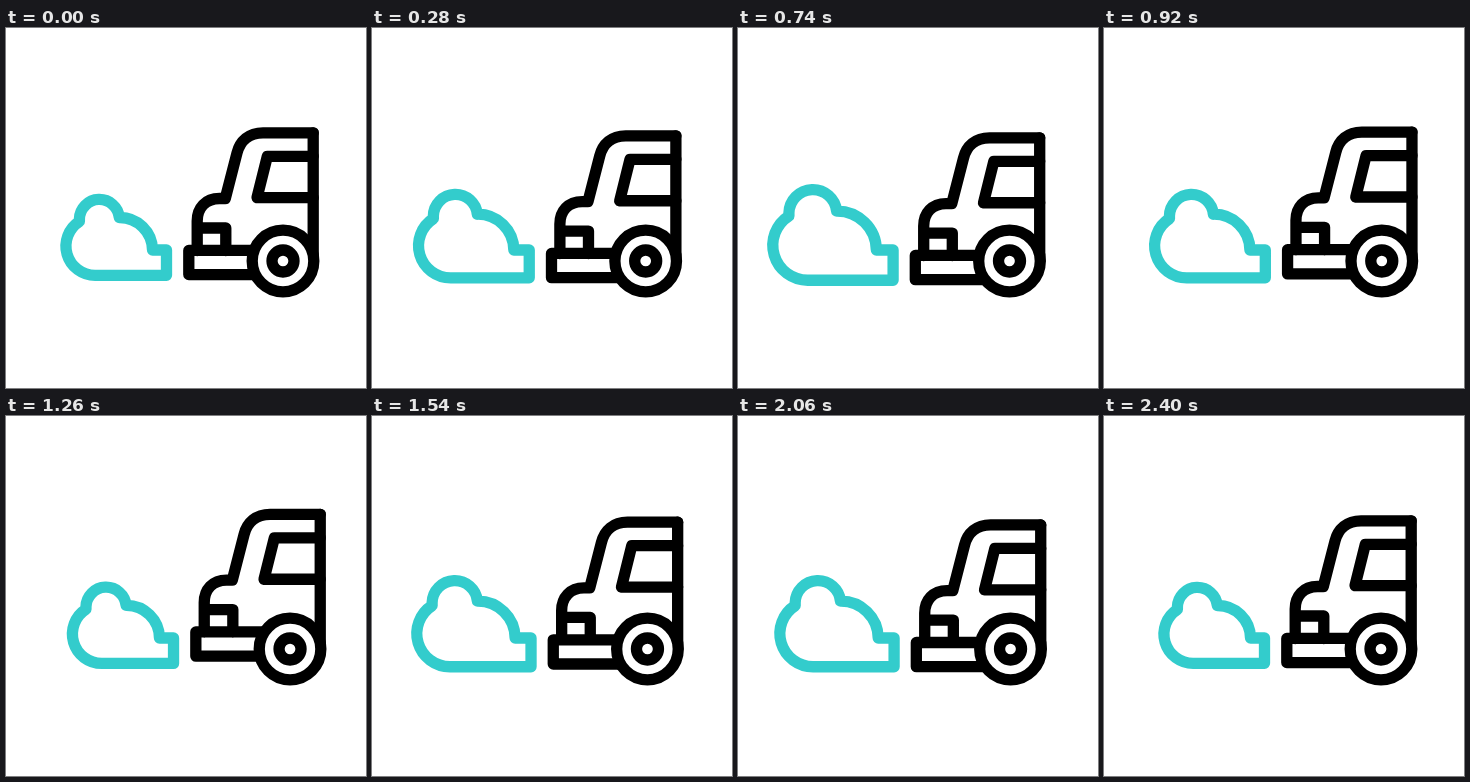
Recreate the animation shown at these times as an HTML page with a canvas. Size 360 px wide and 360 px high, loop 2.42 s.

```html
<!DOCTYPE html>
<html lang="en">
<head>
<meta charset="utf-8">
<title>Truck and smoke</title>
<style>
  html, body { margin: 0; width: 100%; height: 100%; overflow: hidden; background: #fff; }
  canvas { display: block; width: 360px; height: 360px; }
</style>
</head>
<body>
<canvas id="stage" width="360" height="360"></canvas>
<script>
const ctx = document.getElementById('stage').getContext('2d');
const LOOP = 2420, TICK = 20, PHASE = 600, LINE = 11.3;
const BLACK = '#000', TEAL = '#33cccc';
const SWAY = [0, -1, 1, -1, 0];   // truck pose at each phase boundary
const PUFF = [0, 1, 0, 1, 0];     // smoke growth at each phase boundary

const cloud = new Path2D(
  'M160.5 222 V247.3 H89.2 A29.2 29.2 0 0 1 73.4 193.5 V191 ' +
  'A20 20 0 0 1 113.3 189.5 A32.8 32.8 0 0 1 146.5 222 Z');
const body = new Path2D(
  'M307.2 104.8 H257 C243 104.8 234 113 231 125 L219.3 170.5 H213.5 C199.5 170.5 191.2 180 191.2 193 V222.5' +
  'M307.2 128.3 H261.3 L251 169.7 H307.2' +
  'M191.2 200 H219.8 V222.5' +
  'M250 222.4 H182.8 V246.6 H250');

function ease(values, ms) {
  const pos = Math.min(ms / PHASE, values.length - 1);
  const i = Math.min(Math.floor(pos), values.length - 2);
  const k = (1 - Math.cos(Math.PI * (pos - i))) / 2;
  return values[i] + (values[i + 1] - values[i]) * k;
}

function stroke(path, color, width = LINE) {
  ctx.strokeStyle = color;
  ctx.lineWidth = width;
  ctx.stroke(path);
}

function ring(radius) {
  const path = new Path2D();
  path.arc(277, 233, radius, 0, Math.PI * 2);
  ctx.fillStyle = '#fff';
  ctx.fill(path);
  stroke(path, BLACK);
}

function drawCloud(growth) {
  const scale = 1 + 0.225 * growth;
  ctx.save();
  ctx.translate(160, 222);
  ctx.scale(scale, scale);
  ctx.translate(-160, -222);
  stroke(cloud, TEAL, LINE / scale);
  ctx.restore();
}

function drawTruck(lift) {
  ctx.save();
  ctx.translate(0, lift);
  stroke(body, BLACK);
  ctx.restore();
  stroke(new Path2D(`M307.2 ${104.8 + lift} V233`), BLACK);
  ring(30.8);
  ring(11);
}

function draw(ms) {
  const sway = ease(SWAY, ms);
  ctx.fillStyle = '#fff';
  ctx.fillRect(0, 0, 360, 360);
  ctx.lineCap = ctx.lineJoin = 'round';
  ctx.save();
  ctx.translate(7.4 * sway, 0);
  drawCloud(ease(PUFF, ms));
  drawTruck(-6.8 * sway);
  ctx.restore();
}

const start = performance.now();
function frame() {
  const ms = (performance.now() - start) % LOOP;
  draw(Math.floor(ms / TICK + 0.01) * TICK);
  requestAnimationFrame(frame);
}
frame();
</script>
</body>
</html>
```
